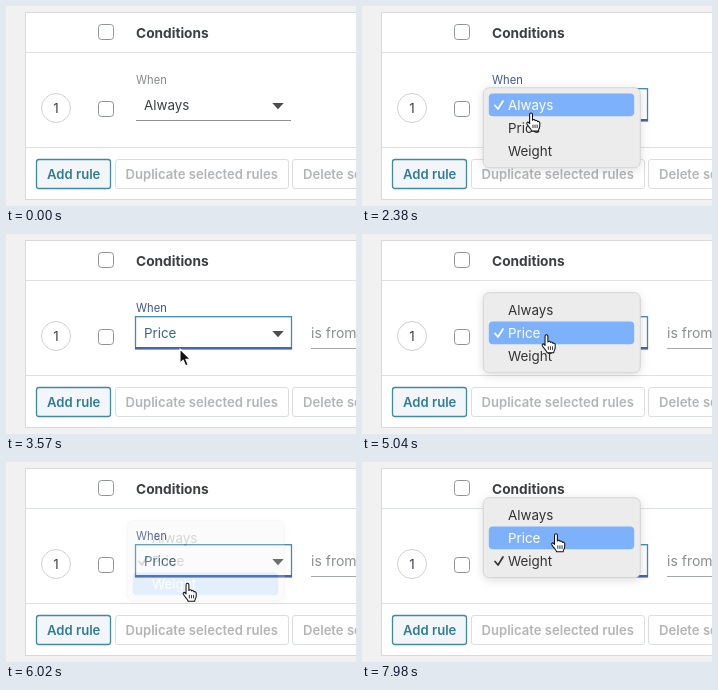
Animation, 350 px wide and 200 px high, one loop 8 s. Source, as an HTML page:

```html
<!DOCTYPE html>
<html lang="en">
<head>
<meta charset="utf-8">
<title>Rule conditions</title>
<style>
html, body { margin: 0; width: 100%; height: 100%; overflow: hidden; background: #f1f1f1; }
svg { display: block; width: 100vw; height: 100vh; }
text { font-family: Inter, "Open Sans", sans-serif; font-size: 13.4px; fill: #3c3f43; }
.btn { font-size: 13.1px; font-weight: 600; fill: #b3b4b6; }
.line { stroke: #dfe0e1; }
.box { fill: #fff; stroke: #8f9296; }
</style>
</head>
<body>
<svg viewBox="0 0 350 200">
  <rect width="350" height="200" fill="#f1f1f1"/>
  <rect x="19.5" y="6.5" width="340" height="187" fill="#fff" stroke="#d8d9db"/>
  <path class="line" d="M20 46.5H350M20 141.5H350"/>
  <rect class="box" x="92.5" y="18.5" width="15" height="15" rx="3"/>
  <rect class="box" x="92.5" y="95.5" width="15" height="15" rx="3"/>
  <text x="130" y="32" font-weight="700" style="font-size:13.7px">Conditions</text>
  <circle cx="50" cy="102" r="14.5" fill="#fff" stroke="#cfd0d2"/>
  <text x="50" y="107" text-anchor="middle">1</text>

  <rect x="30.5" y="153.5" width="74" height="29" rx="2.5" fill="#f3f6f8" stroke="#4189a0" stroke-width="1.3"/>
  <text class="btn" x="41" y="173" style="fill:#2f7c97">Add rule</text>
  <rect x="109.5" y="153.5" width="173" height="29" rx="2.5" fill="#fff" stroke="#dcdddf"/>
  <text class="btn" x="119.5" y="173">Duplicate selected rules</text>
  <rect x="286.5" y="153.5" width="120" height="29" rx="2.5" fill="#fff" stroke="#dcdddf"/>
  <text class="btn" x="297" y="173">Delete selected rules</text>

  <text id="label" x="130" y="78" style="font-size:11.2px">When</text>
  <rect id="under" x="130" width="155"/>
  <g id="focus">
    <rect x="129.5" y="82.7" width="156" height="32" fill="#fff" stroke="#4389b0" stroke-width="1.3"/>
    <rect x="129" y="113" width="157" height="2.4" fill="#4565ae"/>
  </g>
  <text id="value" x="138" y="104"></text>
  <path d="M266.3 97H277.7L272 103.3Z" fill="#4b4d50"/>
  <g id="extra">
    <text x="305" y="104" style="font-size:14px;fill:#8b8d90">is from</text>
    <path d="M305 114.5H350" stroke="#a5a7aa"/>
  </g>

  <g id="menu">
    <rect x="121.3" y="-.3" width="157" height="80" rx="6" fill="#ececec" stroke="#d5d5d5"
      style="filter:drop-shadow(0 2px 5px rgba(0,0,0,.13))"/>
    <rect id="lit" x="126.8" width="145.4" height="22.6" rx="4" fill="#7eb1fb"/>
    <g id="rows"></g>
    <path id="check" d="M133 .5L136 4L141 -4" fill="none" stroke-width="1.7"
      stroke-linecap="round" stroke-linejoin="round"/>
  </g>

  <g id="cursor">
    <circle id="ring" r="31" fill="none" stroke="#111" stroke-width="1.6"/>
    <path id="arrow" d="M0 0V14.2L3.2 11.2L5.6 16.8L8.2 15.7L5.8 10.2H10.2Z"
      fill="#111" stroke="#fff" stroke-width="1.1" stroke-linejoin="round"/>
    <g id="hand" transform="translate(-5 0) scale(1.06)">
      <path d="M3.8 1.8C3.8 -.4 6.5 -.4 6.5 1.8V7C7.2 6 8.8 6.3 9 7.5C9.7 6.8 11.1 7.1 11.3 8.4C12.2 7.8 13.4 8.4 13.4 9.7V12.3C13.4 14.4 12.1 15.3 11.9 17.3H5.8C5.3 15.2 3.1 13.8 1.4 10.9C.4 9.1 2 8.2 3.2 9.6L3.8 10.3Z"
        fill="#fff" stroke="#111" stroke-linejoin="round"/>
      <path d="M6.9 11.2V14.5M8.9 11.2V14.5M10.9 11.2V14.5" stroke="#111" stroke-width=".8"/>
    </g>
  </g>
</svg>
<script>
const LOOP = 8000, STEP = 70, ROW = 23, FIELD_Y = 99;
const OPTIONS = ['Always', 'Price', 'Weight'];
const el = id => document.getElementById(id);
const show = (id, on) => el(id).setAttribute('visibility', on ? 'inherit' : 'hidden');
const set = (id, attrs) => { for (const k in attrs) el(id).setAttribute(k, attrs[k]); };
const within = (t, spans) => spans.some(([a, b]) => t >= a && t < b);

// Cursor path: time, x, y
const PATH = [
  [840, 33, 126], [1470, 168.5, 105.5], [2310, 168.5, 105.5], [2730, 170, 122.5],
  [3290, 170, 122.5], [3570, 174, 115], [3710, 174, 115], [4060, 182, 98],
  [4830, 182, 98], [5040, 184, 100.5], [5600, 181, 121], [6650, 181, 121],
  [6930, 188, 102], [7630, 188, 102], [7980, 193.5, 71.5]
];
const HAND = [[1260, 3360], [4410, 6160], [6790, LOOP]];
const RING = [[1680, 1890], [2870, 2940], [4550, 4690], [5670, 5740], [7000, 7140]];
const MENUS = [
  { open: 1750, pick: 2870, chosen: 0 },
  { open: 4690, pick: 5670, chosen: 1 },
  { open: 7070, pick: LOOP, chosen: 2 }
];
const SETTLE = 420; // from picking an option to the new value
const FLASH = [70, 210], FADE = 175;

const rows = OPTIONS.map((name, i) => {
  const row = document.createElementNS('http://www.w3.org/2000/svg', 'text');
  row.textContent = name;
  row.setAttribute('x', 146);
  row.setAttribute('y', 22 + ROW * i);
  return el('rows').appendChild(row);
});

function cursorAt(t) {
  const i = PATH.findIndex(p => p[0] > t);
  if (i < 0) return PATH[PATH.length - 1].slice(1);
  if (i === 0) return PATH[0].slice(1);
  const [a, x, y] = PATH[i - 1], [b, x2, y2] = PATH[i];
  const k = (t - a) / (b - a), e = k * k * (3 - 2 * k);
  return [x + (x2 - x) * e, y + (y2 - y) * e];
}

function drawMenu(t, y) {
  const menu = MENUS.find(m => t >= m.open && t < m.pick + FLASH[1] + FADE);
  show('menu', menu);
  if (!menu) return;
  const { pick, chosen } = menu, since = t - pick;
  const top = FIELD_Y - 17 - ROW * chosen;
  const over = Math.floor((y - top - 5.5) / ROW);
  const lit = since >= FLASH[0] && since < FLASH[1] ? -1 : over;
  const ink = i => i === lit ? '#fff' : '#333';
  set('menu', {
    transform: `translate(0 ${top})`,
    opacity: Math.min(1, 1 - (since - FLASH[1]) / FADE)
  });
  show('lit', lit >= 0);
  set('lit', { y: 5.6 + ROW * lit });
  rows.forEach((row, i) => row.style.fill = ink(i));
  set('check', { transform: `translate(0 ${17 + ROW * chosen})`, stroke: ink(chosen) });
}

function draw(t) {
  const [x, y] = cursorAt(t), hand = within(t, HAND);
  const focus = t >= MENUS[0].open, hover = t >= HAND[0][0];
  const value = MENUS.filter(m => t >= m.pick + SETTLE).length;

  el('value').textContent = OPTIONS[value];
  el('value').style.fill = focus ? '#3d687f' : hover ? '#3a86a6' : '#3c3f43';
  el('label').style.fill = focus ? '#3f568f' : '#85878a';
  show('focus', focus);
  set('under', hover
    ? { y: 113, height: 2, fill: '#151515' }
    : { y: 114, height: 1, fill: '#8f9194' });
  show('extra', t >= 3360);

  drawMenu(t, y);
  show('cursor', t >= PATH[0][0]);
  set('cursor', { transform: `translate(${x} ${y})` });
  show('hand', hand);
  show('arrow', !hand);
  show('ring', within(t, RING));
}

const start = performance.now();
function tick() {
  const t = (performance.now() - start) % LOOP;
  draw(Math.floor(t / STEP) * STEP);
  requestAnimationFrame(tick);
}
tick();
</script>
</body>
</html>
```
